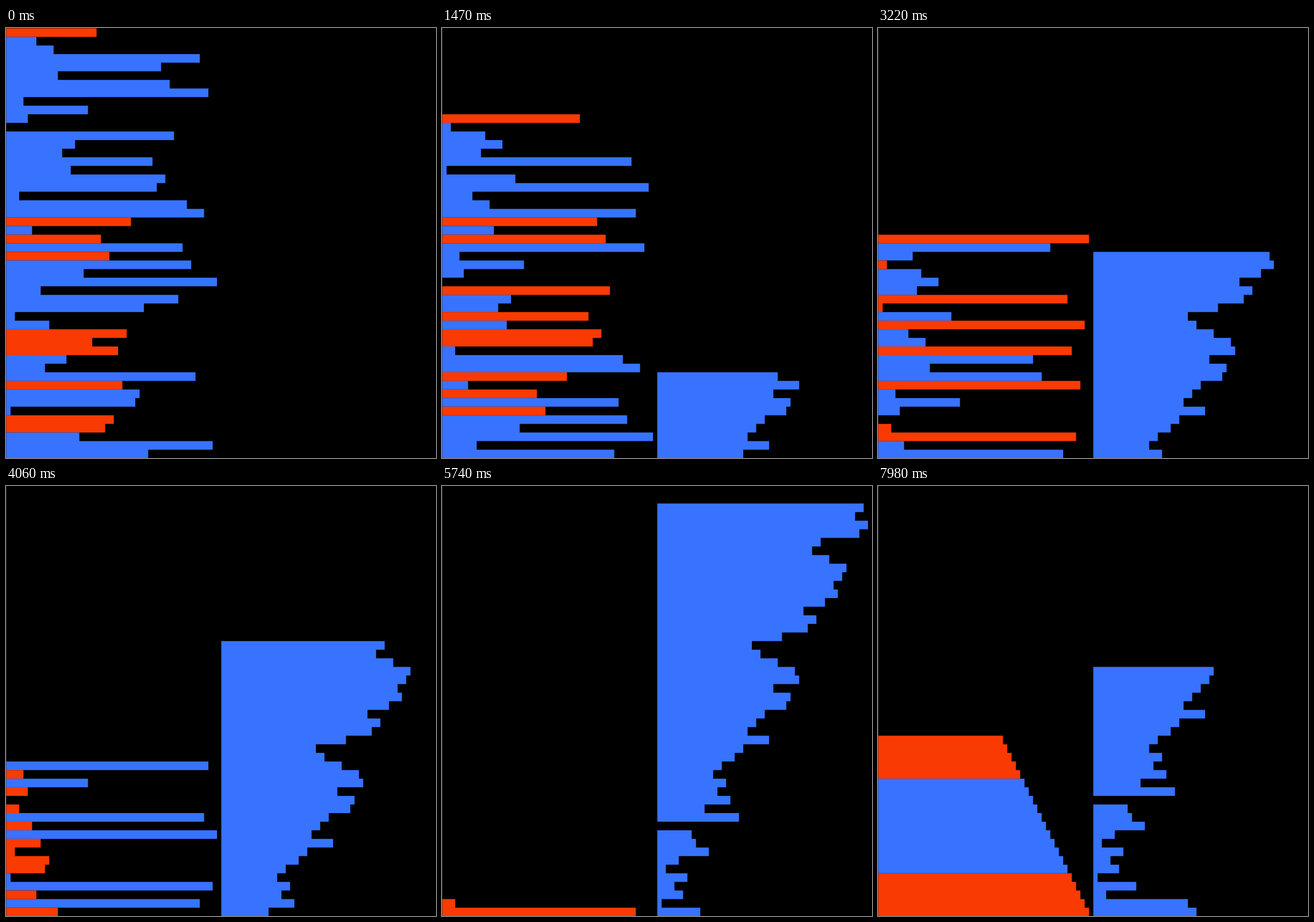
These frames come from a looping animation (748x748 px, 8000 ms). A matplotlib script:

```python
from itertools import groupby

import matplotlib.pyplot as plt
from matplotlib.animation import FuncAnimation
from matplotlib.collections import PolyCollection
from matplotlib.patches import Rectangle

SIZE, COUNT = 748, 50
ROW, UNIT = SIZE / COUNT, SIZE / COUNT / 2
EDGE = 0.5
BLUE, RED = "#3773ff", "#fa3a03"
LOOP, TICK, STEP = 8000, 20, 70   # milliseconds
OP, LAG = 39.21, 21               # time per operation, first delay

START = [21, 7, 11, 45, 36, 12, 38, 47, 4, 19, 5, 0, 39, 16, 13, 34, 15,
         37, 35, 3, 42, 46, 29, 6, 22, 41, 24, 43, 18, 49, 8, 40, 32, 2,
         10, 28, 20, 26, 14, 9, 44, 27, 31, 30, 1, 25, 23, 17, 48, 33]

# A number is brought to the top and pushed; "-" adds rb, "+" adds rr.
SPREAD = """21 23 25 30 31 27 33 26- 20- 28 32 rra rra ss 18- 24 22 29
35 37 15- 34 13- 16- 39 42 ra ra ra 41 ra 43 40 14- 44 sb 17- 11+ 36 38
wait 47 19- 0+ 46 49 sb 8- 9- 48 12+ 5- 2+ 7+ 4+ 6+ 1+ 10+ 3- 45"""
GATHER = "48 49 sa 47 46 45 " + " ".join(str(v) for v in range(44, 26, -1))


def rotate(s):
    if s:
        s.append(s.pop(0))


def reverse(s):
    s.insert(0, s.pop())


def swap(s):
    s[0], s[1] = s[1], s[0]


def simulate():
    a, b = list(START), []
    states = [(list(a), [], 20)]
    named = {"ra": (rotate, [a]), "rra": (reverse, [a]), "sa": (swap, [a]),
             "sb": (swap, [b]), "ss": (swap, [a, b]), "wait": (len, [a])}

    def run(plan, src, dst, low):
        def save():
            states.append((list(a), list(b), low))

        for token in plan.split():
            if token in named:
                move, stacks = named[token]
                for s in stacks:
                    move(s)
                save()
                continue
            value = int(token.rstrip("+-"))
            move = rotate if src.index(value) <= len(src) / 2 else reverse
            while src[0] != value:
                move(src)
                save()
            dst.insert(0, src.pop(0))
            save()
            if token[-1] in "+-":
                rotate(b)
                if token[-1] == "+":
                    rotate(a)
                save()

    run(SPREAD, a, b, 20)
    run(GATHER, b, a, -5)
    return states


def blocks(stack, colors, x0):
    """One stepped outline for each run of equal colour."""
    rows = list(zip(range(COUNT - len(stack), COUNT), stack, colors))
    for color, run in groupby(rows, key=lambda r: r[2]):
        run = list(run)
        points = [(x0, run[0][0] * ROW + EDGE)]
        for i, value, _ in run:
            x = x0 + value * UNIT
            points += [(x, i * ROW + EDGE), (x, (i + 1) * ROW + EDGE)]
        points.append((x0, points[-1][1]))
        yield points, color


STATES = simulate()

fig = plt.figure(figsize=(SIZE / 100, SIZE / 100), dpi=100, facecolor="black")
ax = fig.add_axes([0, 0, 1, 1])
ax.set_xlim(0, SIZE)
ax.set_ylim(SIZE, 0)
ax.axis("off")
ax.add_patch(Rectangle((0, 0), 1, SIZE, color="#303030", lw=0, aa=False))
shapes = PolyCollection([], linewidths=0, antialiaseds=True, snap=False)
ax.add_collection(shapes, autolim=False)


def draw(frame):
    step = (frame * TICK + TICK // 2) // STEP
    op = max(0, int((step * STEP - LAG) / OP))
    a, b, low = STATES[min(op, len(STATES) - 1)]
    rank = {v: i for i, v in enumerate(sorted(a))}
    hues = [RED if (rank[v] - low) % len(a) < 10 else BLUE for v in a]
    parts = [*blocks(a, hues, EDGE),
             *blocks(b, [BLUE] * len(b), SIZE / 2 + EDGE)]
    shapes.set_verts([points for points, _ in parts])
    shapes.set_facecolor([color for _, color in parts])
    return [shapes]


anim = FuncAnimation(fig, draw, frames=LOOP // TICK, interval=TICK,
                     init_func=lambda: draw(0), repeat=True, repeat_delay=0)
plt.show()
```
